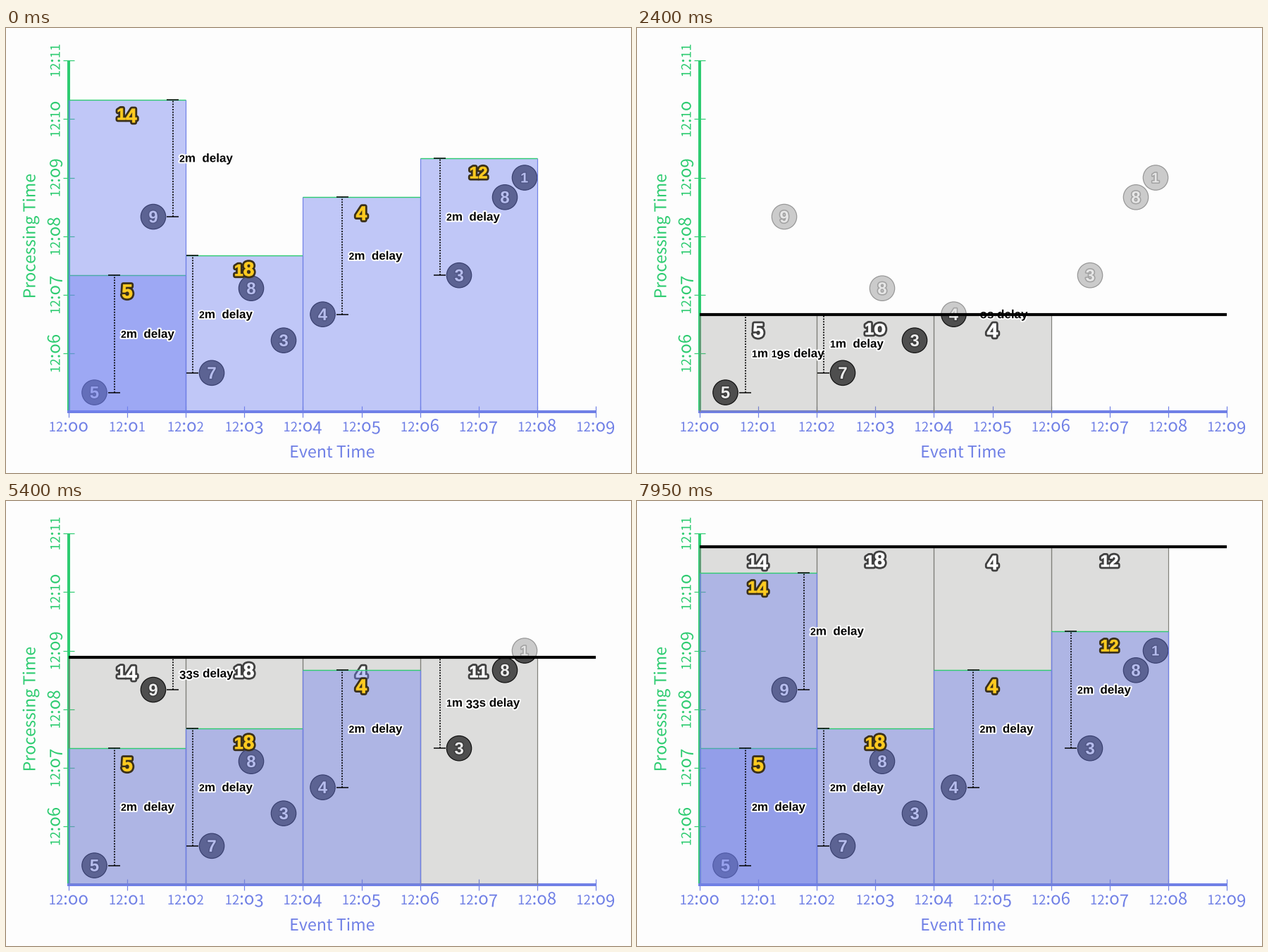
A matplotlib script that plays this animation: 887x632 px, repeating every 8 s.

```python
import matplotlib.pyplot as plt
from matplotlib.animation import FuncAnimation
from matplotlib.lines import Line2D
from matplotlib.patches import Circle, PathPatch, Rectangle
from matplotlib.path import Path
from matplotlib.textpath import TextPath

W, H, DPI = 887, 632, 64
PT = 72 / DPI                       # points per pixel
FRAME_MS, STEP_MS, LOOP_MS = 50, 150, 8000

LEFT, RIGHT, TOP, BOTTOM = 89, 837, 46.2, 545.3
MINUTE_X = (RIGHT - LEFT) / 9
MINUTE_Y = (BOTTOM - TOP) / 6
STEPS_PER_MINUTE = 9
DELAY_STEPS = 2 * STEPS_PER_MINUTE

GREEN, BLUE, PANE_BLUE = "#2ecc71", "#7080e6", "#7080f0"
YELLOW, YELLOW_RIM = "#ffcb20", "#3a301a"
GREY = "#80807a"
DARK = dict(face="#4e4e4e", edge="#101010", text="#ececec", rim="#3a3a3a")
LIGHT = dict(face="#cbcbcb", edge="#969696", text="#e6e6e6", rim="#a2a2a2")

# value, x, arrival step
EVENTS = [(5, 125.5, 4), (7, 292, 7), (3, 394, 12), (4, 449.5, 16), (8, 348, 20),
          (3, 643, 22), (9, 209, 31), (8, 708, 34), (1, 736, 37)]
# window, first arrival step, emitted value, x of the delay marker
PANES = [(0, 4, 5, 153.5), (1, 7, 18, 264.5), (2, 16, 4, 477),
         (3, 22, 12, 615.5), (0, 31, 14, 236.5)]

fig = plt.figure(figsize=(W / DPI, H / DPI), dpi=DPI, facecolor="#fdfdfd")
ax = fig.add_axes([0, 0, 1, 1])
ax.set_xlim(0, W)
ax.set_ylim(H, 0)
ax.axis("off")

REGULAR = {"family": "Noto Sans CJK JP"}
BOLD = {"family": "Liberation Sans", "weight": "bold"}
glyphs = {}
texts = {}


def step_y(step):
    return BOTTOM - (step - 1) * MINUTE_Y / STEPS_PER_MINUTE


def window_x(index):
    return LEFT + 2 * MINUTE_X * index


def glyph(ch, font):
    """Outline and advance of one character at size 1."""
    key = ch, font["family"]
    if key not in glyphs:
        def outline(s):
            return TextPath((0, 0), s, size=100, prop=font)
        advance = outline(f"H{ch}H").get_extents().width - outline("HH").get_extents().width
        shape = None
        if ch != " ":
            path = outline(ch)
            shape = path.vertices / 100, path.codes
        glyphs[key] = shape, advance / 100
    return glyphs[key]


def text_path(s, size, font):
    """Text with old-style figures, baseline at y = 0, y upwards."""
    key = s, size, font["family"]
    if key not in texts:
        x, parts = 0, []
        small = 0.83 if font is BOLD else 0.77
        for ch in s:
            scale = size * (small if ch in "12" else 1)
            drop = 0.14 * size if ch in "34579" else 0
            shape, advance = glyph("o" if ch == "0" else ch, font)
            if shape:
                parts.append(Path(shape[0] * scale + (x, -drop), shape[1]))
            x += advance * scale
        texts[key] = Path.make_compound_path(*parts)
    return texts[key]


def add(artist):
    artist.set_zorder(1)
    ax.add_artist(artist)
    return artist


def line(xs, ys, color, width, **style):
    style.setdefault("solid_capstyle", "butt")
    return add(Line2D(xs, ys, color=color, lw=width * PT, **style))


def text(s, x, y, size, font, color, rim=None, rim_width=0, swell=0,
         center=True, middle=False, upright=False):
    """Draw text; swell thickens the letters, rim outlines them."""
    path = text_path(s, size, font)
    box = path.get_extents()
    verts = path.vertices.copy()
    if center:
        verts[:, 0] -= (box.x0 + box.x1) / 2
    if middle:
        verts[:, 1] -= (box.y0 + box.y1) / 2
    if upright:
        verts = verts[:, ::-1] * -1 + (x, y)
    else:
        verts = verts * (1, -1) + (x, y)
    path = Path(verts, path.codes)
    made = []
    if rim:
        made.append(add(PathPatch(path, fc=rim, ec=rim, lw=2 * rim_width * PT,
                                  joinstyle="round")))
    made.append(add(PathPatch(path, fc=color, ec=color, lw=2 * swell * PT,
                              joinstyle="round")))
    return made


def draw_axes():
    line([LEFT, LEFT], [TOP, BOTTOM], GREEN, 4)
    line([LEFT - 2, RIGHT], [BOTTOM, BOTTOM], BLUE, 4)
    for i in range(10):
        x = LEFT + i * MINUTE_X
        line([x, x], [BOTTOM - 8, BOTTOM + 8], BLUE, 1.2)
        text(f"12:{i:02d}", x, 573, 24, REGULAR, BLUE)
    for i in range(1, 7):
        y = BOTTOM - i * MINUTE_Y
        line([LEFT - 8, LEFT + 8], [y, y], GREEN, 1.2)
        text(f"12:{5 + i:02d}", 76.5, y, 24, REGULAR, GREEN, upright=True)
    text("Event Time", 463.5, 610, 23.2, REGULAR, BLUE)
    text("Processing Time", 41.5, 295, 23.2, REGULAR, GREEN, upright=True)


def draw_event(value, x, y, look, y0, y1):
    """One event, visible only between y0 and y1."""
    if y + 19 < y0 or y - 19 > y1:
        return
    parts = [add(Circle((x, y), 17.7, fc=look["face"], ec=look["edge"], lw=1.2 * PT))]
    parts += text(str(value), x, y, 24, BOLD, look["text"], look["rim"], 1.6, middle=True)
    for part in parts:
        part.set_clip_path(Rectangle((0, y0), W, y1 - y0, transform=ax.transData))


def draw_pane(window, top, face, edge, alpha):
    x0, x1 = window_x(window), window_x(window + 1)
    add(Rectangle((x0, top), x1 - x0, BOTTOM - top, fc=face, alpha=alpha, lw=0))
    for x in (x0, x1):
        line([x, x], [top, BOTTOM], edge, 1.2)


def draw_value(value, window, top, color, rim):
    text(str(value), window_x(window + 0.5), top + 28.5, 28, BOLD, color, rim, 3.2, swell=0.4)


def delay_label(steps):
    minutes = steps / STEPS_PER_MINUTE
    whole, seconds = int(minutes), int(minutes % 1 * 60)
    parts = [f"{whole}m "] if whole else []
    if seconds or not whole:
        parts.append(f"{seconds}s")
    return "".join(parts) + " delay"


def draw_delay(x, start, now):
    steps = min(now - start, DELAY_STEPS)
    y0, y1 = step_y(start), step_y(start + steps)
    line([x, x], [y0, y1], "black", 1.8, linestyle=(0, (1, 1.1)))
    line([x - 8.5, x + 8.5], [y0, y0], "black", 1.5)
    if steps == DELAY_STEPS:
        line([x - 8.5, x + 8.5], [y1, y1], "black", 1.5)
    text(delay_label(steps), x + 9.5, (y0 + y1) / 2 + 5.5, 17, BOLD,
         "black", "white", 2, center=False)


draw_axes()
static = set(ax.get_children())


def draw(frame):
    for artist in ax.get_children():
        if artist not in static:
            artist.remove()

    step = frame * FRAME_MS // STEP_MS
    sweeping = step > 0             # the loop opens on the finished result
    now = step if sweeping else 1000
    line_y = step_y(step) if sweeping else 0

    for value, x, arrival in EVENTS:
        draw_event(value, x, step_y(arrival), LIGHT, 0, line_y)

    totals = {}
    for value, x, arrival in EVENTS:
        if arrival <= now:
            window = int((x - LEFT) / (2 * MINUTE_X))
            totals[window] = totals.get(window, 0) + value
    if sweeping:
        for window in totals:
            draw_pane(window, line_y, GREY, GREY, 0.25)

    for value, x, arrival in EVENTS:
        draw_event(value, x, step_y(arrival), DARK, line_y, H)
    if sweeping:
        for window, total in totals.items():
            draw_value(total, window, line_y, "white", "#404040")

    emitted = [p for p in PANES if p[1] + DELAY_STEPS <= now]
    for window, start, _, _ in emitted:
        top = step_y(start + DELAY_STEPS)
        draw_pane(window, top, PANE_BLUE, BLUE, 0.426)
        line([window_x(window), window_x(window + 1)], [top, top], GREEN, 1.4)
    for window, start, value, _ in emitted:
        draw_value(value, window, step_y(start + DELAY_STEPS), YELLOW, YELLOW_RIM)
    for _, start, _, x in PANES:
        if start <= now:
            draw_delay(x, start, now)

    if sweeping:
        line([LEFT, RIGHT], [line_y, line_y], "black", 4.2)
    return []


anim = FuncAnimation(fig, draw, frames=LOOP_MS // FRAME_MS, interval=FRAME_MS,
                     init_func=lambda: [], repeat=True, repeat_delay=0, blit=False)
plt.show()
```
